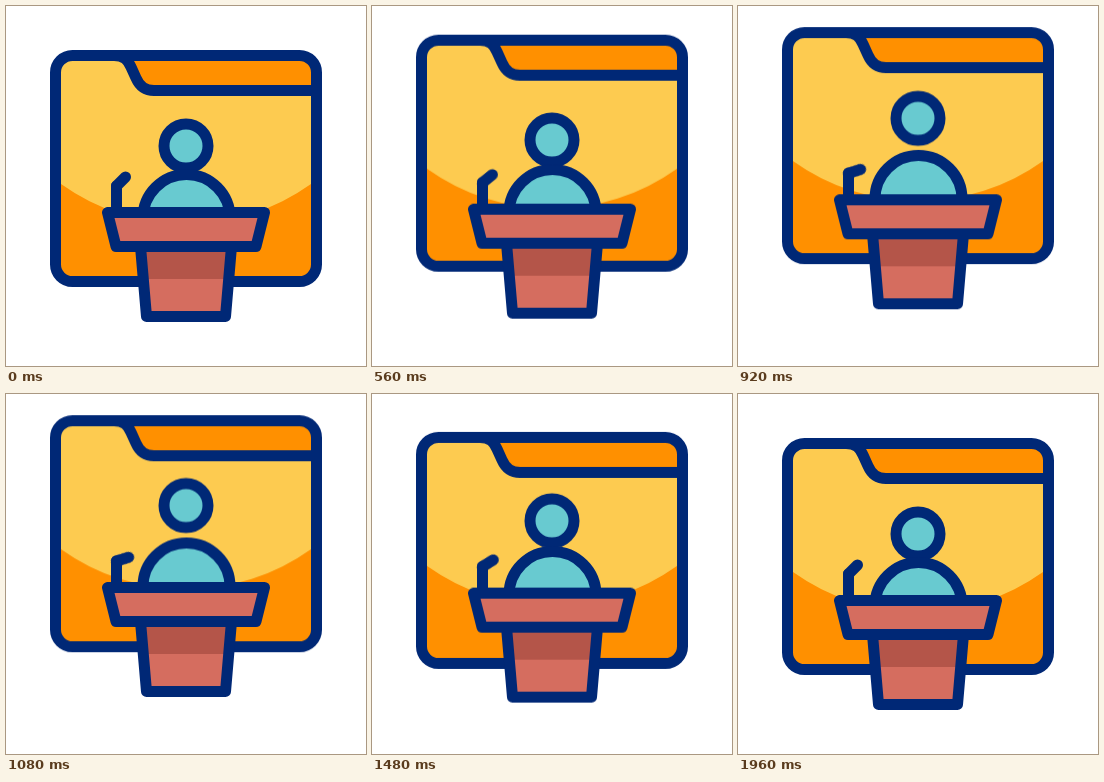
These frames come from a looping animation (360 px wide and 360 px high, 2 s). An HTML page:

```html
<!DOCTYPE html>
<html lang="en">
<head>
<meta charset="utf-8">
<title>Speaker at a podium</title>
<style>
  html, body { margin: 0; width: 100%; height: 100%; overflow: hidden; background: #fff; }
  svg { display: block; width: 100%; height: 100%; }
  .line { fill: none; stroke: #002876; stroke-width: 11; stroke-linejoin: round; }
  .round { stroke-linecap: round; }
  .yellow { fill: #fdcb50; }
  .orange { fill: #ff9000; }
  .cyan { fill: #68cad0; }
  .red { fill: #d56d5f; }
  .dark { fill: #b45549; }

  .folder, .head, .body, .podium, .arm {
    animation: 2s cubic-bezier(.65, 0, .35, 1) infinite;
  }
  .folder { --lift: -23px; animation-name: early; }
  .podium { --lift: -13px; animation-name: late; }
  .body { --lift: -19.5px; animation-name: late; }
  .head { --lift: -28.5px; animation-name: bob; }
  .arm { transform-origin: 110.5px 180px; animation-name: tilt; }

  @keyframes early {
    0%, 90.5%, 100% { transform: none; }
    50% { transform: translateY(var(--lift)); }
  }
  @keyframes late {
    0%, 12%, 95%, 100% { transform: translateY(0); }
    52%, 55% { transform: translateY(var(--lift)); }
  }
  @keyframes bob {
    0%, 13%, 93.5%, 100% { transform: translateY(0); }
    53%, 53.5% { transform: translateY(var(--lift)); }
  }
  @keyframes tilt {
    0%, 13%, 93.5%, 100% { transform: rotate(0deg); }
    53%, 53.5% { transform: rotate(28deg); }
  }
</style>
</head>
<body>
<svg viewBox="0 0 360 360">
  <g class="folder">
    <rect class="yellow" x="49.5" y="49.5" width="261" height="226" rx="17"/>
    <path class="orange" d="M55 178A215 215 0 0 0 305 178L310 258.500Q310 275 293 275H67Q50 275 50 258Z"/>
    <path class="orange" d="M108 49.500C118 49.500 122 54 125 61L130 72C134 81 139 84.500 148 84.500H310V66Q310 50 293 50Z"/>
    <path class="line" d="M108 49.500C118 49.500 122 54 125 61L130 72C134 81 139 84.500 148 84.500H310"/>
    <rect class="line" x="49.5" y="49.5" width="261" height="226" rx="17"/>
  </g>

  <g class="head">
    <circle class="line cyan" cx="180" cy="140" r="22"/>
  </g>

  <g class="body">
    <path class="line cyan" d="M137 222V212A43.500 43.500 0 0 1 224 212V222"/>
  </g>

  <g class="podium">
    <path class="line round" d="M110.500 206V180"/>
    <path class="line round arm" d="M110.500 180L119.500 171"/>
    <path class="red" d="M134.500 240.500L140.500 310.500H219.500L225.500 240.500Z"/>
    <path class="dark" d="M134.500 240.500L137.300 273H222.700L225.500 240.500Z"/>
    <path class="line" d="M134.500 240.500L140.500 310.500H219.500L225.500 240.500"/>
    <path class="line red" d="M101.500 206.500H258.500L250 240.500H110Z"/>
  </g>
</svg>
</body>
</html>
```
